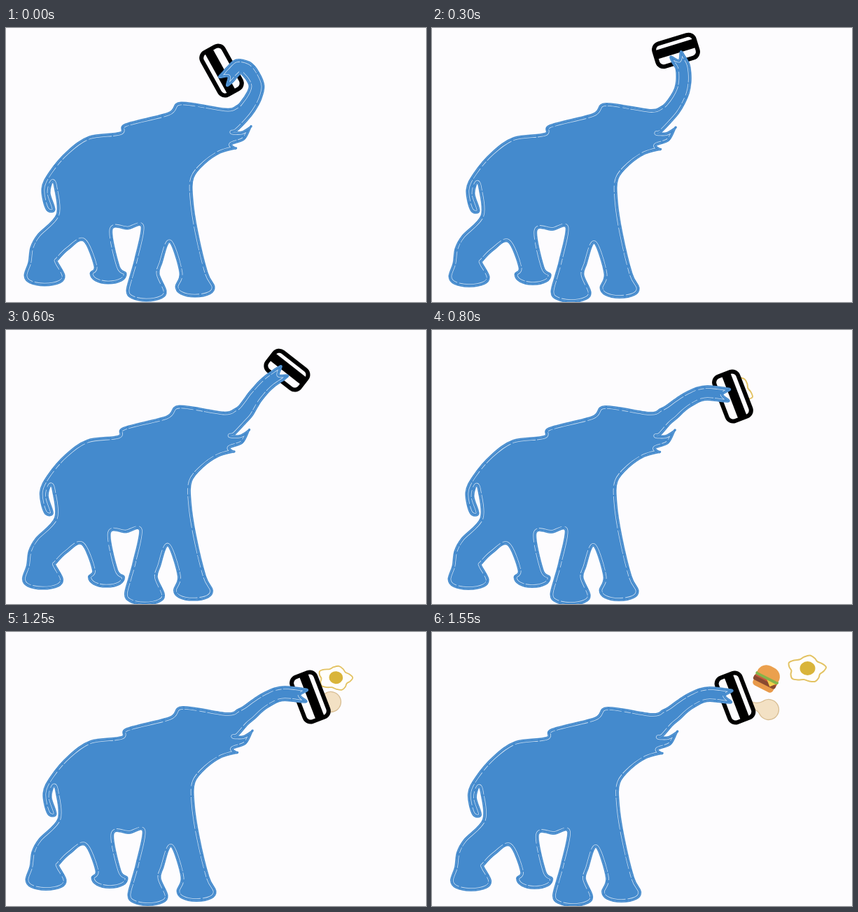
An HTML page with a canvas for the animation above (1600 ms loop, 600 by 392 pixels).

```html
<!DOCTYPE html>
<html lang="en">
<head>
<meta charset="utf-8">
<title>Elephant with a lunch card</title>
<style>
html, body { margin: 0; width: 100%; height: 100%; overflow: hidden; background: #fdfcfe; }
canvas { display: block; }
</style>
</head>
<body>
<canvas id="stage" width="600" height="392"></canvas>
<script>
const ctx = document.getElementById('stage').getContext('2d');
const LOOP = 1600, STEP = 50;
const BLUE = '#448acd', PAPER = '#fdfcfe';

// One foot from right ankle to left ankle; h is the ankle height.
const foot = (l, r, y, h) => [
  [r - 10, y - h], [r, y - 14], [r - 6, y - 4], [(l + r) / 2, y],
  [l + 7, y - 4], [l, y - 14], [l + 6, y - h]];

// Outline from the jaw round the legs to the forehead; a doubled point is sharp.
const body = [
  [329, 147], [323, 149], [337, 149], [349, 142], [349, 142], [340, 159], [322, 166],
  [327, 172], [327, 172], [306, 178], [284, 193], [267, 214], [266, 245], [273, 292],
  ...foot(243, 297, 384, 34), [234, 306], [222, 336],
  ...foot(173, 228, 390, 38), [185, 330], [194, 284], [174, 287], [151, 288],
  ...foot(121, 171, 365, 24), [111, 304], [89, 316], [74, 331],
  ...foot(27, 83, 368, 33), [36, 314], [46, 296], [73, 267],
  [70, 228], [66, 220], [62, 236], [69, 260], [58, 259], [52, 230], [63, 206],
  [88, 177], [119, 156], [163, 150], [171, 138], [232, 122], [250, 107], [313, 116]];

// Trunk centre lines after the shared root.
const root = [[319, 131], [341, 118]];
const trunks = [
  [358, 83, 337, 54, 316, 71],
  [359, 88, 361, 58, 354, 43],
  [358, 94, 376, 74, 394, 61],
  [364, 100, 390, 88, 420, 90]];

// Card: x, y, degrees, length, width
const cards = [[308, 61, -119, 75, 41], [350.5, 31, -17, 66, 40], [404, 55.5, 38, 65, 40], [432.5, 92.5, 69, 74, 42]];

// Keyframes: time, then values
const phaseKeys = [[0, 0], [100, .6], [300, 1], [600, 2], [800, 3]];
const swayKeys = [[0, 0, 0], [300, -2, 1.5], [800, -3, 2.5], [950, 1, -1.5], [1250, 2, .5], [1550, .5, 1.5]];
const eggKeys = [[700, 424, 90, 1, 30], [950, 446, 76, .95, 30], [1250, 470, 66, .9, 4], [1350, 489, 61, .93, 2], [1550, 535, 53, 1, 0]];
const legKeys = [[1050, 438, 90], [1250, 464, 100], [1550, 481, 111]];
const burgerKeys = [[1300, 436, 88], [1550, 478, 67]];

function at(keys, t) {
  if (t <= keys[0][0]) return keys[0].slice(1);
  for (let i = 1; i < keys.length; i++) {
    const a = keys[i - 1], b = keys[i];
    if (t <= b[0]) {
      const s = (t - a[0]) / (b[0] - a[0]);
      return a.slice(1).map((v, j) => v + (b[j + 1] - v) * s);
    }
  }
  return keys[keys.length - 1].slice(1);
}

// Smooth curve through a row of vectors, p counted in entries.
function spline(list, p) {
  const last = list.length - 1;
  const i = Math.min(Math.floor(p), last - 1), s = p - i;
  const a = list[Math.max(i - 1, 0)], b = list[i], c = list[i + 1], d = list[Math.min(i + 2, last)];
  const s2 = s * s, s3 = s2 * s;
  return b.map((v, j) => v * (2 * s3 - 3 * s2 + 1) + c[j] * (3 * s2 - 2 * s3)
    + (c[j] - a[j]) / 2 * (s3 - 2 * s2 + s) + (d[j] - v) / 2 * (s3 - s2));
}

// Closed smooth shape through the points.
function blob(pts) {
  const n = pts.length, path = new Path2D(), pt = i => pts[(i + n) % n];
  path.moveTo(...pts[0]);
  for (let i = 0; i < n; i++) {
    const [a, b, c, d] = [pt(i - 1), pt(i), pt(i + 1), pt(i + 2)];
    path.bezierCurveTo(
      b[0] + (c[0] - a[0]) / 6, b[1] + (c[1] - a[1]) / 6,
      c[0] - (d[0] - b[0]) / 6, c[1] - (d[1] - b[1]) / 6, ...c);
  }
  path.closePath();
  return path;
}

// Tapered trunk around its centre line, ending in two fingers.
function trunkEdge(v) {
  const spine = [...root, [v[0], v[1]], [v[2], v[3]], [v[4], v[5]]];
  const upper = [], lower = [];
  let end, dir;
  for (let i = 2; i <= 10; i++) {
    const u = i / 10, p = u * 4;
    const [x, y] = end = spline(spine, p), [px, py] = spline(spine, p - .05);
    const len = Math.hypot(x - px, y - py);
    const [hx, hy] = dir = [(x - px) / len, (y - py) / len];
    const w = 9.5 + 7 * (1 - u) ** 4;
    upper.push([x + hy * w, y - hx * w]);
    lower.unshift([x - hy * w, y + hx * w]);
  }
  const tip = (fwd, side) => [end[0] + dir[0] * fwd + dir[1] * side, end[1] + dir[1] * fwd - dir[0] * side];
  return [...upper, tip(8, 8), tip(-2, 0), tip(8, -8), ...lower];
}

function place(x, y, deg, scale, draw) {
  ctx.save();
  ctx.translate(x, y);
  ctx.rotate(deg * Math.PI / 180);
  ctx.scale(scale, scale);
  draw();
  ctx.restore();
}

function box(x, y, w, h, r, color) {
  ctx.beginPath();
  ctx.roundRect(x, y, w, h, r);
  ctx.fillStyle = color;
  ctx.fill();
}

function drawEgg() {
  // Oval with five soft corners.
  const white = blob(Array.from({ length: 20 }, (_, i) => {
    const a = i * Math.PI / 10 - .14, r = 1 + .13 * Math.cos(i * Math.PI / 2);
    return [25 * r * Math.cos(a), 17.5 * r * Math.sin(a)];
  }));
  ctx.fillStyle = '#fffefc';
  ctx.fill(white);
  ctx.strokeStyle = '#e3c262';
  ctx.lineWidth = 2;
  ctx.stroke(white);
  ctx.beginPath();
  ctx.ellipse(1.5, -1, 11, 10, 0, 0, 7);
  ctx.fillStyle = '#d9b43a';
  ctx.fill();
}

function drawDrumstick() {
  ctx.beginPath();
  ctx.moveTo(-24, -11);
  ctx.quadraticCurveTo(-15, -8, -8, -12);
  ctx.arc(0, 0, 14.5, -2.15, 2.5);
  ctx.quadraticCurveTo(-15, 1, -24, -2);
  ctx.closePath();
  ctx.fillStyle = '#f3e1c4';
  ctx.fill();
  ctx.strokeStyle = '#d8bd92';
  ctx.lineWidth = 1.3;
  ctx.stroke();
}

function drawBurger() {
  box(-16, 8, 32, 8, [1, 1, 5, 5], '#e8994a');
  box(-18, 1, 35, 8, 3, '#8a4a30');
  box(-17, 0, 34, 3, 1, '#c9583c');
  ctx.beginPath();
  ctx.moveTo(0, 0);
  ctx.lineTo(16, 0);
  ctx.lineTo(9, 8);
  ctx.fillStyle = '#f4cf4c';
  ctx.fill();
  box(-18, -4, 36, 5, 2.5, '#86b34a');
  box(-17, -19, 34, 16, [15, 15, 2, 2], '#eba04e');
}

function drawCard(len, wid) {
  const w = len - 6, h = wid - 6;
  box(-w / 2, -h / 2, w, h, 9, PAPER);
  ctx.strokeStyle = '#000';
  ctx.lineWidth = 6;
  ctx.stroke();
  ctx.fillStyle = '#000';
  ctx.fillRect(-w / 2, -9, w, 13);
}

function drawElephant(trunk) {
  const shape = blob([...body, ...trunkEdge(trunk)]);
  const line = (color, width) => {
    ctx.strokeStyle = color;
    ctx.lineWidth = width;
    ctx.stroke(shape);
  };
  ctx.lineJoin = 'round';
  ctx.fillStyle = BLUE;
  ctx.fill(shape);
  line(BLUE, 3);
  // Stitched line just inside the edge.
  ctx.save();
  ctx.clip(shape);
  ctx.setLineDash([34, 2, 18, 4, 9, 2, 46, 3]);
  line('rgba(255,255,255,.7)', 6.6);
  ctx.setLineDash([]);
  line(BLUE, 5);
  ctx.restore();
}

function draw(t) {
  const [phase] = at(phaseKeys, t);
  const [cx, cy, angle, len, wid] = spline(cards, phase);

  ctx.fillStyle = PAPER;
  ctx.fillRect(0, 0, 600, 392);

  if (t >= 700) {
    const [x, y, scale, deg] = at(eggKeys, t);
    place(x, y, deg, scale, drawEgg);
  }
  if (t >= 1100) place(...at(legKeys, t), 0, 1, drawDrumstick);
  if (t >= 1350) place(...at(burgerKeys, t), 27, 1, drawBurger);

  ctx.save();
  ctx.translate(...at(swayKeys, t));
  place(cx, cy, angle, 1, () => drawCard(len, wid));
  drawElephant(spline(trunks, phase));
  ctx.restore();
}

const start = performance.now();
function tick() {
  let t = Math.floor((performance.now() - start) % LOOP / STEP) * STEP;
  if (t < 100) t = 0;
  else if (t < 300) t = 100;
  draw(t);
  requestAnimationFrame(tick);
}
tick();
</script>
</body>
</html>
```
